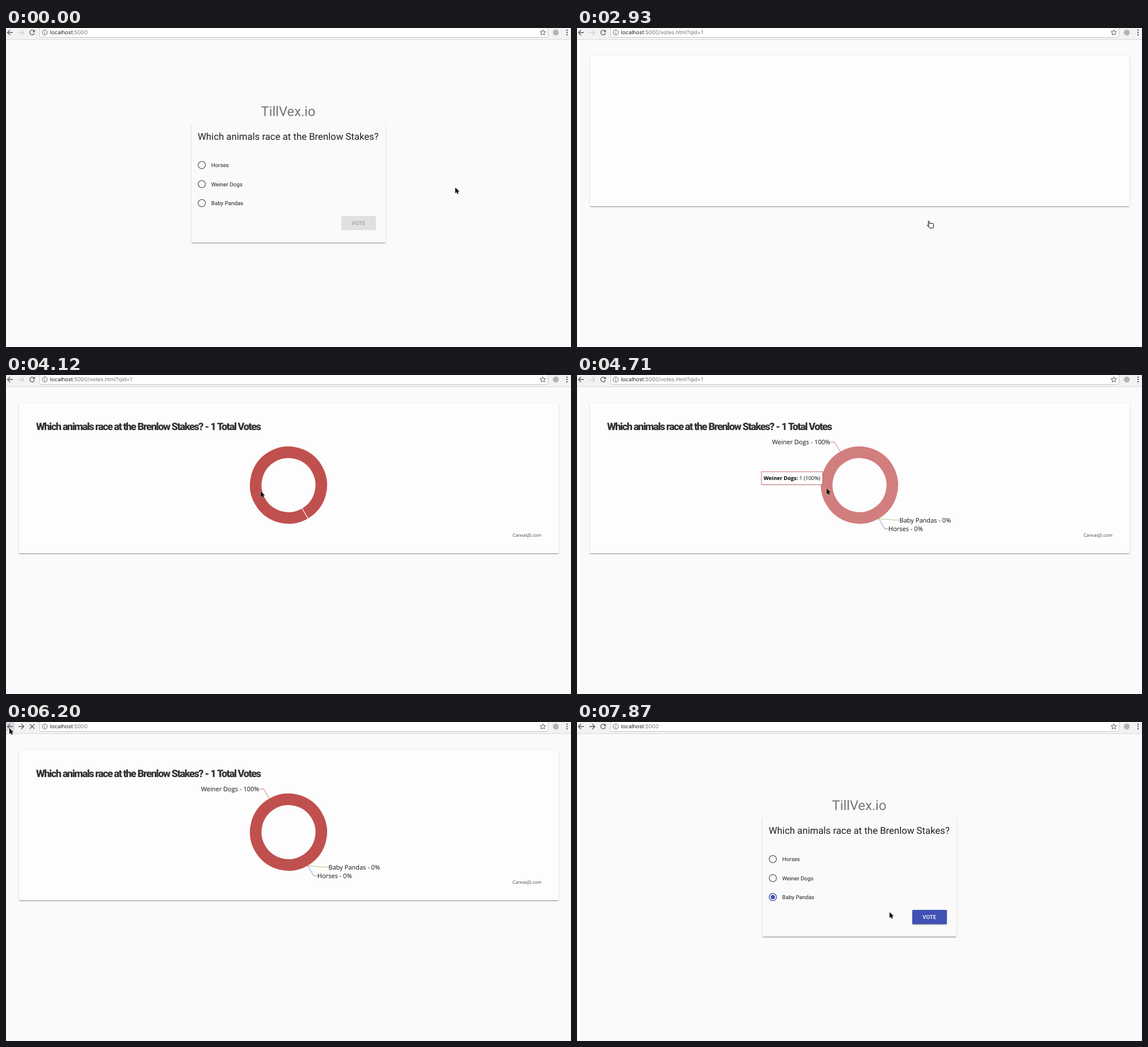
These frames come from a looping animation (996x562 px, 8 s). An HTML page:

```html
<!DOCTYPE html>
<html lang="en">
<head>
<meta charset="utf-8">
<title>Poll</title>
<style>
  html, body { margin: 0; width: 100%; height: 100%; overflow: hidden; background: #fafafa; }
  svg { position: absolute; left: 0; top: 0; width: 996px; height: 562px; text-rendering: geometricPrecision; }
  .card, .btn {
    position: absolute; border-radius: 1.5px;
    box-shadow: 0 1.4px 1.4px rgba(0,0,0,.18), 0 .7px 3px rgba(0,0,0,.14), 0 2px .7px -1.4px rgba(0,0,0,.3);
  }
  #pollCard { left: 327px; top: 168.5px; width: 342px; height: 209.5px; background: #fafafa; }
  #chartCard { left: 22.5px; top: 49px; width: 951px; height: 264.5px; background: #fdfdfd; }
  #vote { left: 590.5px; top: 331px; width: 61.5px; height: 24.5px; }
  .ui { font-family: Roboto, sans-serif; }
  .url { font: 9.45px Inter, sans-serif; }
  .chart { font-family: "Open Sans", "Noto Sans", sans-serif; }
  .line { fill: none; stroke: #5a5a5a; stroke-width: 1.3; }
  .thin { stroke-width: 1; }
  .radio { fill: none; stroke: #666; stroke-width: 1.4; }
  .lead { fill: none; stroke-width: .8; }
</style>
</head>
<body>
<div id="pollCard" class="card"></div>
<div id="vote" class="btn"></div>
<div id="chartCard" class="card"></div>

<svg viewBox="0 0 996 562">
  <g id="bar">
    <rect width="996" height="20" fill="#f2f2f2"/>
    <rect y="20" width="996" height="1" fill="#d8d8d8"/>
    <rect x="59.5" y="-9" width="896" height="25.5" rx="2" fill="#fff" stroke="#c6c6c6"/>
    <rect id="hover" x="-3" y="-2" width="18" height="18" rx="2" fill="#dadada"/>
    <path class="line" d="M12 8H2.5m4.7-4.7L2.5 8l4.7 4.7"/>
    <path id="fwd" class="line" d="M22 8h9.5m-4.7-4.7L31.5 8l-4.7 4.7"/>
    <g id="reload">
      <path class="line" d="M49.3 5.2A4.2 4.2 0 1 0 50.2 8.8"/>
      <path d="M50.8 3v4.2h-4.2z" fill="#5a5a5a"/>
    </g>
    <path id="stop" class="line" d="M42 4l8 8m0-8l-8 8"/>
    <circle class="line thin" cx="68.3" cy="8" r="4.5"/>
    <path class="line thin" d="M68.3 7.4v3.4m0-5.6v1.3"/>
    <text class="url" x="77.5" y="11" fill="#222">localhost<tspan fill="#777">:5000<tspan id="path"></tspan></tspan></text>
    <path id="star" class="line thin"/>
    <circle cx="969.2" cy="8" r="5.2" fill="#b4b4b4"/>
    <path d="M989 4v9" stroke="#5a5a5a" stroke-width="2.4" stroke-linecap="round" stroke-dasharray="0 4"/>
  </g>

  <g id="poll" class="ui">
    <text x="497.5" y="155" font-size="23.7" text-anchor="middle" fill="#757575">TillVex.io</text>
    <text x="338" y="197" font-size="16.76" fill="#212121">Which animals race at the Brenlow Stakes?</text>
    <g id="options"></g>
    <text id="voteText" x="621.3" y="346.5" font-size="9.77" font-weight="500" text-anchor="middle">VOTE</text>
  </g>

  <g id="results" class="chart">
    <g id="chart">
      <text x="53" y="96.5" font-family="Roboto, sans-serif" font-size="18" font-weight="900" letter-spacing="-1.35" fill="#333">Which animals race at the Brenlow Stakes? - 1 Total Votes</text>
      <circle id="ring" cx="498" cy="194" r="57.8" fill="none" stroke-width="20.5" pathLength="1" transform="rotate(60 498 194)"/>
      <path id="seam" d="M522 235l10.5 18" stroke="#fff" stroke-width="1.2"/>
      <text x="944" y="285" font-size="7.95" text-anchor="end" fill="#444">CanvasJS.com</text>
    </g>
    <g id="labels" font-size="11.06" fill="#111">
      <path class="lead" stroke="#c0504e" d="M447 118h7l10 17"/>
      <path class="lead" stroke="#9bbb58" d="M532 253l26 2.5h11"/>
      <path class="lead" stroke="#4f81bc" d="M532 253l10.5 18h6.5"/>
      <text x="343.7" y="121.5">Weiner Dogs - 100%</text>
      <text x="568.5" y="259.5">Baby Pandas - 0%</text>
      <text x="549" y="275">Horses - 0%</text>
    </g>
    <g id="tip">
      <rect x="-114" y="-28.5" width="108" height="23" fill="#000" opacity=".12"/>
      <rect x="-115" y="-29.5" width="108" height="22.5" fill="#fff" stroke="#c0504e" stroke-width=".8"/>
      <text x="-111" y="-14.8" font-size="9.3"><tspan font-weight="700">Weiner Dogs:</tspan> 1 (100%)</text>
    </g>
  </g>

  <g id="cursor">
    <path id="arrow" d="M0 0v10.2l2.3-2.2 1.6 3.6 1.8-.8-1.6-3.5h3.2z" stroke="#fff" stroke-width=".8" paint-order="stroke"/>
    <path id="hand" d="M-3.5 6l2.5 1V0q1-1.5 2 0v4q4-1 6.500 1v4l-1 3H1z" transform="rotate(-8)" fill="#fff" stroke="#111" stroke-linejoin="round"/>
  </g>
</svg>

<script>
const LOOP = 8000;
const FIRST = 550, STEP = 148.75;   // the screen refreshes on a steady beat
const LEAD = 6;
const at = {
  pick: 1740, load: 2480, results: 2930, chart: 3070, labels: 4260, hover: 4410, leave: 5010,
  back: 5600, reload: 6200, blank: 6350, poll: 6500, away: 6850, repick: 7540
};

// pointer moves: start, end, target x, y
const home = [792, 281];
const moves = [
  [500, 700, 440, 193], [700, 1440, 378, 275], [1890, 2180, 664, 380],
  [2180, 2480, 620, 341], [3370, 3820, 449, 205], [4120, 4710, 440, 200],
  [4860, at.back, 6, 11], [6650, 7390, 382, 306], [at.repick, 7838, 551, 335]
];

const $ = id => document.getElementById(id);
const show = (id, on) => { $(id).style.display = on ? '' : 'none'; };
const clamp = p => Math.min(1, Math.max(0, p));
const smooth = p => p * p * (3 - 2 * p);
const within = (t, a, b) => t >= a && t < b;

function beat(now) {
  const n = Math.floor((now + LEAD - FIRST) / STEP);
  return n < 0 ? 0 : FIRST + n * STEP;
}

function pointer(t) {
  let [x, y] = home;
  for (const [a, b, tx, ty] of moves) {
    const p = smooth(clamp((t - a) / (b - a)));
    x += (tx - x) * p;
    y += (ty - y) * p;
  }
  const onOption = within(x, 338, 420) && within(y, 260, 318);
  const onVote = within(x, 590, 652) && within(y, 331, 356);
  return { x, y, hand: onOption || onVote };
}

$('star').setAttribute('d', 'M' + Array.from({ length: 10 }, (_, i) => {
  const r = i % 2 ? 2.4 : 5.2, a = i * Math.PI / 5;
  return [946.3 + r * Math.sin(a), 8.2 - r * Math.cos(a)];
}).join('L') + 'Z');

$('options').innerHTML = ['Horses', 'Weiner Dogs', 'Baby Pandas'].map((name, i) =>
  `<g transform="translate(345.2 ${241.5 + i * 33.5})">
    <circle class="radio" r="6.4"/>
    <circle class="dot" r="3.7" fill="#3f51b5"/>
    <text x="16.6" y="3.5" font-size="9.77" fill="#212121">${name}</text>
  </g>`).join('');
const radios = document.querySelectorAll('.radio');
const dots = document.querySelectorAll('.dot');

function drawPoll(t) {
  const picked = t >= at.repick ? 2 : within(t, at.pick, at.results) ? 1 : -1;
  const age = t - (picked === 2 ? at.repick : at.pick);
  const ready = picked >= 0 && age > STEP / 2;
  radios.forEach((r, i) => {
    r.style.stroke = i === picked ? '#3f51b5' : '#666';
    dots[i].style.display = i === picked ? '' : 'none';
  });
  $('vote').style.background = ready ? '#3f51b5' : picked >= 0 ? '#cfcfde' : '#e0e0e0';
  $('vote').style.boxShadow = ready ? '' : 'none';
  $('voteText').setAttribute('fill', picked >= 0 ? '#fff' : '#a2a2a2');
}

function drawChart(t, x, y) {
  const sweep = 1 - (1 - clamp((t - at.chart) / 1050)) ** 2;
  const hover = within(t, at.hover, at.leave);
  $('ring').setAttribute('stroke', hover ? '#d17f7e' : '#c0504e');
  $('ring').setAttribute('stroke-dasharray', sweep < 1 ? `${sweep} 2` : 'none');
  show('chart', t >= at.chart);
  show('seam', t < at.labels);
  show('labels', t >= at.labels);
  show('tip', hover);
  $('tip').setAttribute('transform', `translate(${x} ${y})`);
}

function draw(now) {
  const t = beat(now);
  const { x, y, hand } = pointer(t);
  const onPoll = t < at.results || t >= at.poll;
  const onChart = within(t, at.results, at.blank);
  const loading = within(t, at.load, at.results) || within(t, at.reload, at.poll);

  for (const id of ['poll', 'pollCard', 'vote']) show(id, onPoll);
  for (const id of ['results', 'chartCard']) show(id, onChart);
  show('reload', !loading);
  show('stop', loading);
  show('hover', within(t, at.back, at.away));
  $('fwd').style.stroke = t >= at.reload ? '#5a5a5a' : '#d0d0d0';
  $('path').textContent = within(t, at.results, at.reload) ? '/votes.html?qid=1' : '';

  drawPoll(t);
  drawChart(t, x, y);
  show('hand', hand);
  show('arrow', !hand);
  $('cursor').setAttribute('transform', `translate(${x} ${y})`);
}

const start = performance.now();
function loop() {
  draw((performance.now() - start) % LOOP);
  requestAnimationFrame(loop);
}
loop();
</script>
</body>
</html>
```
